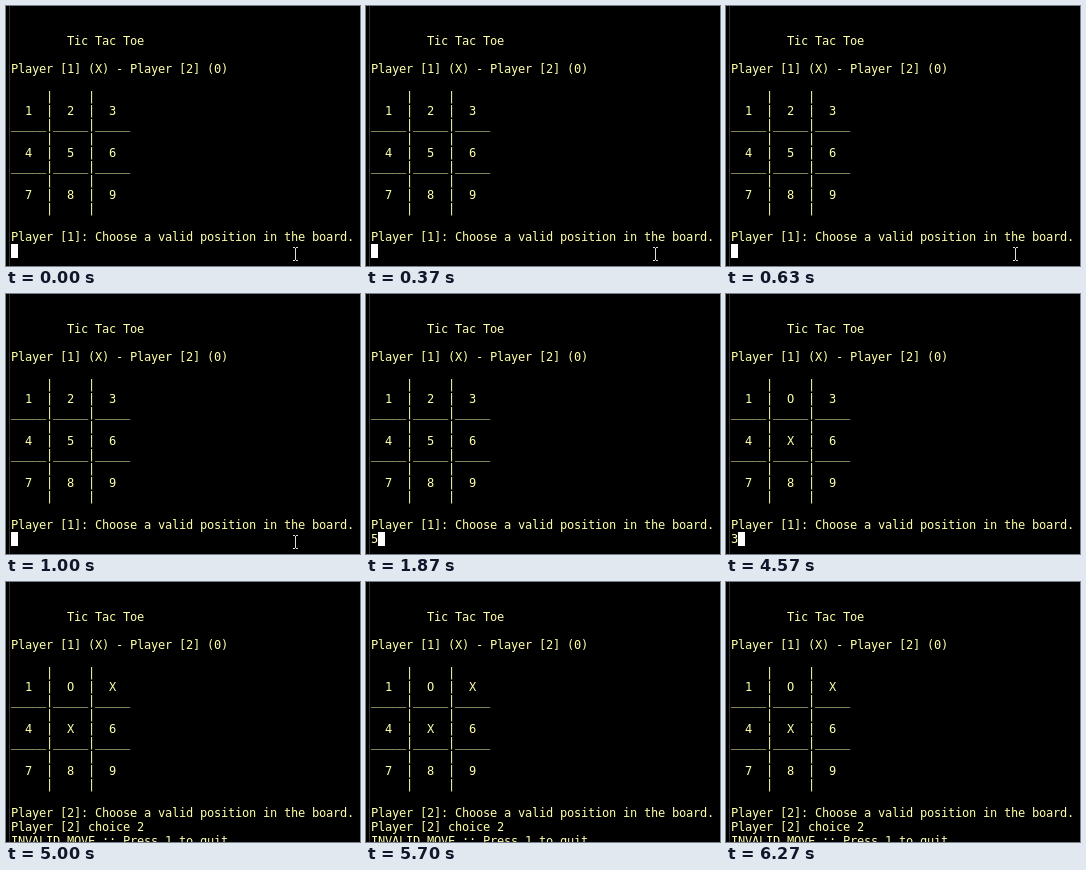
These frames come from a looping animation (354x260 px, 8 s). An HTML page with a canvas:

```html
<!DOCTYPE html>
<html lang="en">
<head>
<meta charset="utf-8">
<title>Tic Tac Toe</title>
<style>
  html, body { margin: 0; width: 100%; height: 100%; overflow: hidden; background: #000; }
  canvas { display: block; }
</style>
</head>
<body>
<canvas width="354" height="260"></canvas>
<script>
const ctx = document.querySelector('canvas').getContext('2d');
const LOOP = 8000, LEFT = 5, TOP = 28, CELL_W = 7, CELL_H = 14, BASELINE = 11;

// Terminal states; each holds from its start time until the next one.
const states = [
  { at: 0, cells: '123456789', player: 1, input: '', pointer: true },
  { at: 1770, cells: '123456789', player: 1, input: '5' },
  { at: 2970, cells: '1O34X6789', player: 1, input: '' },
  { at: 4570, cells: '1O34X6789', player: 1, input: '3' },
  { at: 4970, cells: '1OX4X6789', player: 2,
    output: ['Player [2] choice 2', 'INVALID MOVE :: Press 1 to quit'] }
];

function boardLines(cells) {
  const bars = '     |     |';
  const rule = '_____|_____|_____';
  return [0, 3, 6].flatMap(i => [
    bars,
    [...cells.slice(i, i + 3)].map(c => `  ${c}  `).join('|'),
    i < 6 ? rule : bars
  ]);
}

function printLine(text, row) {
  [...text].forEach((ch, col) =>
    ctx.fillText(ch, LEFT + col * CELL_W, TOP + row * CELL_H + BASELINE));
}

function drawPointer() {
  ctx.fillStyle = '#ddd';
  ctx.fillRect(289, 242, 1, 12);
  for (const y of [241, 254]) {
    ctx.fillRect(287, y, 2, 1);
    ctx.fillRect(290, y, 2, 1);
  }
}

function draw(time) {
  const { cells, player, input, output, pointer } = states.findLast(s => s.at <= time);
  ctx.fillStyle = '#000';
  ctx.fillRect(0, 0, 354, 260);
  ctx.fillStyle = '#303030';
  ctx.fillRect(3, 0, 1, 260);

  ctx.font = '12px "DejaVu Sans Mono", monospace';
  ctx.fillStyle = '#ffffaa';
  [
    '        Tic Tac Toe',
    '',
    'Player [1] (X) - Player [2] (0)',
    '',
    ...boardLines(cells),
    '',
    `Player [${player}]: Choose a valid position in the board.`,
    ...(output || [input])
  ].forEach(printLine);

  if (!output) {
    ctx.fillStyle = '#fff';
    ctx.fillRect(LEFT + input.length * CELL_W, TOP + 15 * CELL_H, CELL_W, CELL_H);
  }
  if (pointer) drawPointer();
}

function tick() {
  draw(performance.now() % LOOP);
  requestAnimationFrame(tick);
}
tick();
</script>
</body>
</html>
```
